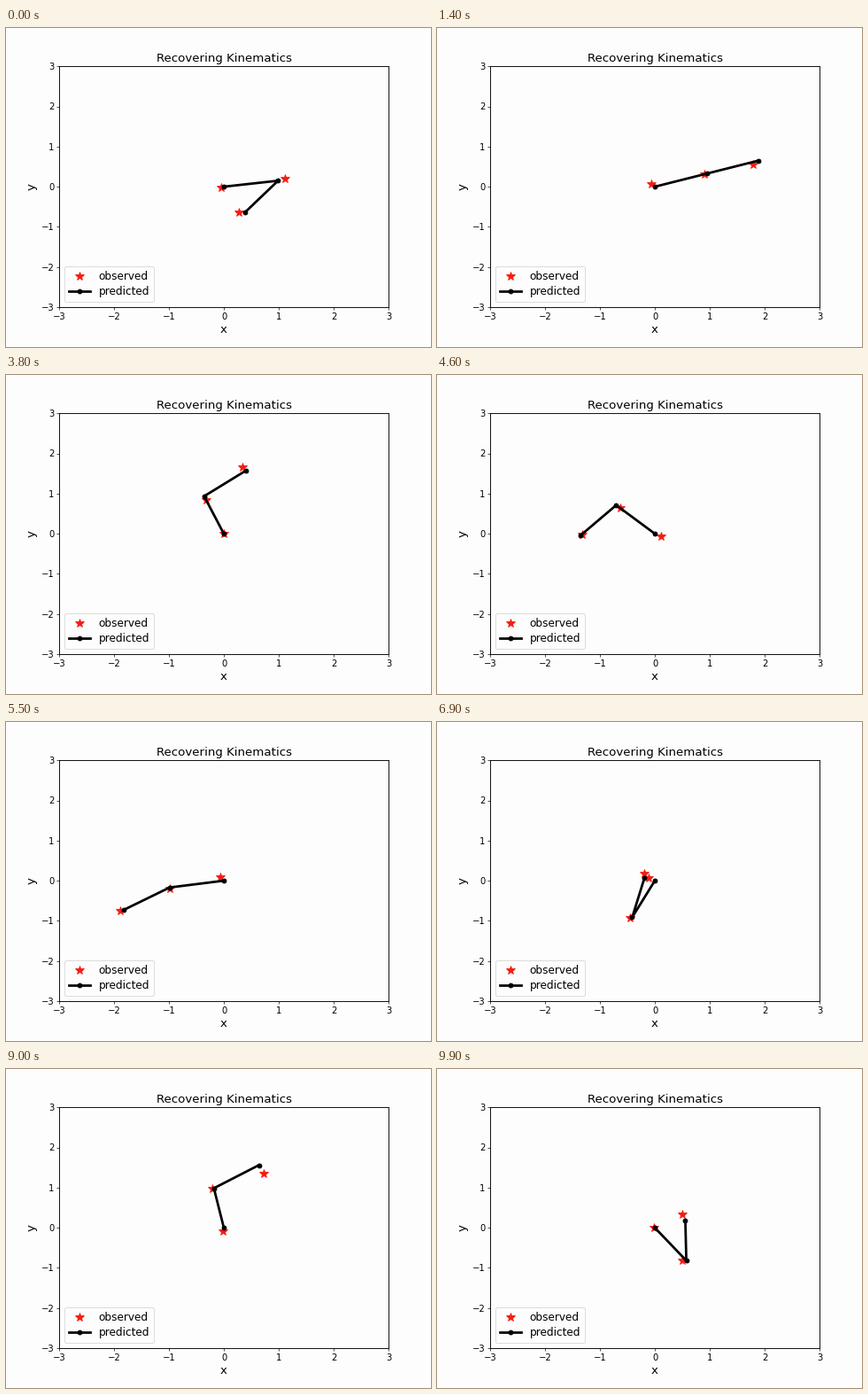
Recreate the animation shown at these times as a matplotlib script. Size 480 by 360 pixels, loop 10 s.

```python
import numpy as np
import matplotlib.pyplot as plt
from matplotlib.animation import FuncAnimation

FRAMES, INTERVAL = 100, 100
PAPER, RED = "#fdfdfd", "#f41c12"
NOISE = 0.07

# Key poses: time step, shoulder angle, elbow bend (degrees)
POSES = [
    (0, 8.6, -136), (14, 19, 0), (28, 72, 10), (38, 111, -71),
    (44, 126, -239), (55, 189.7, -336), (66, 243, -313), (69, 245.7, -168.5),
    (80, 141.5, 149.3), (91, 94, 312), (99, -55, 506),
]


def ease_through(t, knots, values):
    """Cubic curve through the key values that never overshoots them."""
    h = np.diff(knots)
    rate = np.diff(values) / h
    a, b = rate[:-1], rate[1:]
    same = a * b > 0
    inner = np.where(same, 2 * a * b / np.where(same, a + b, 1), 0)
    slope = np.concatenate([rate[:1], inner, rate[-1:]])

    i = np.clip(np.searchsorted(knots, t, side="right") - 1, 0, len(h) - 1)
    u, v = (t - knots[i]) / h[i], (knots[i + 1] - t) / h[i]
    return (v * v * (1 + 2 * u) * values[i] + u * u * (1 + 2 * v) * values[i + 1]
            + u * v * h[i] * (v * slope[i] - u * slope[i + 1]))


def forward(shoulder, bend):
    """Positions of base, elbow and hand for unit-length links."""
    turns = np.radians(np.stack([shoulder, shoulder + bend], axis=1))
    links = np.stack([np.cos(turns), np.sin(turns)], axis=-1)
    base = np.zeros((len(turns), 1, 2))
    return np.concatenate([base, links.cumsum(axis=1)], axis=1)


steps = np.arange(FRAMES)
knots, shoulder, bend = np.array(POSES, dtype=float).T
predicted = forward(ease_through(steps, knots, shoulder),
                    ease_through(steps, knots, bend))
rng = np.random.default_rng(4)
observed = predicted + rng.normal(0, NOISE, predicted.shape)

plt.rcParams.update({
    "font.family": "DejaVu Sans",
    "axes.linewidth": 1.1,
    "axes.titlesize": 16,
    "axes.labelsize": 16,
    "xtick.labelsize": 12,
    "ytick.labelsize": 12,
})
fig, ax = plt.subplots(figsize=(8, 6), dpi=60, facecolor=PAPER)
fig.subplots_adjust(left=0.125, right=0.9, bottom=0.125, top=0.88)
ax.set(xlim=(-3, 3), ylim=(-3, 3), xlabel="x", ylabel="y",
       title="Recovering Kinematics", facecolor=PAPER)

stars, = ax.plot([], [], "*", color=RED, ms=12, label="observed")
arm, = ax.plot([], [], "o-", color="black", lw=3.3, ms=6, label="predicted")
ax.legend(loc="lower left", fontsize=14.5, labelspacing=0.35, facecolor=PAPER)


def update(step):
    stars.set_data(*observed[step].T)
    arm.set_data(*predicted[step].T)
    return stars, arm


anim = FuncAnimation(fig, update, frames=FRAMES, interval=INTERVAL,
                     repeat=True, repeat_delay=0)
plt.show()
```
